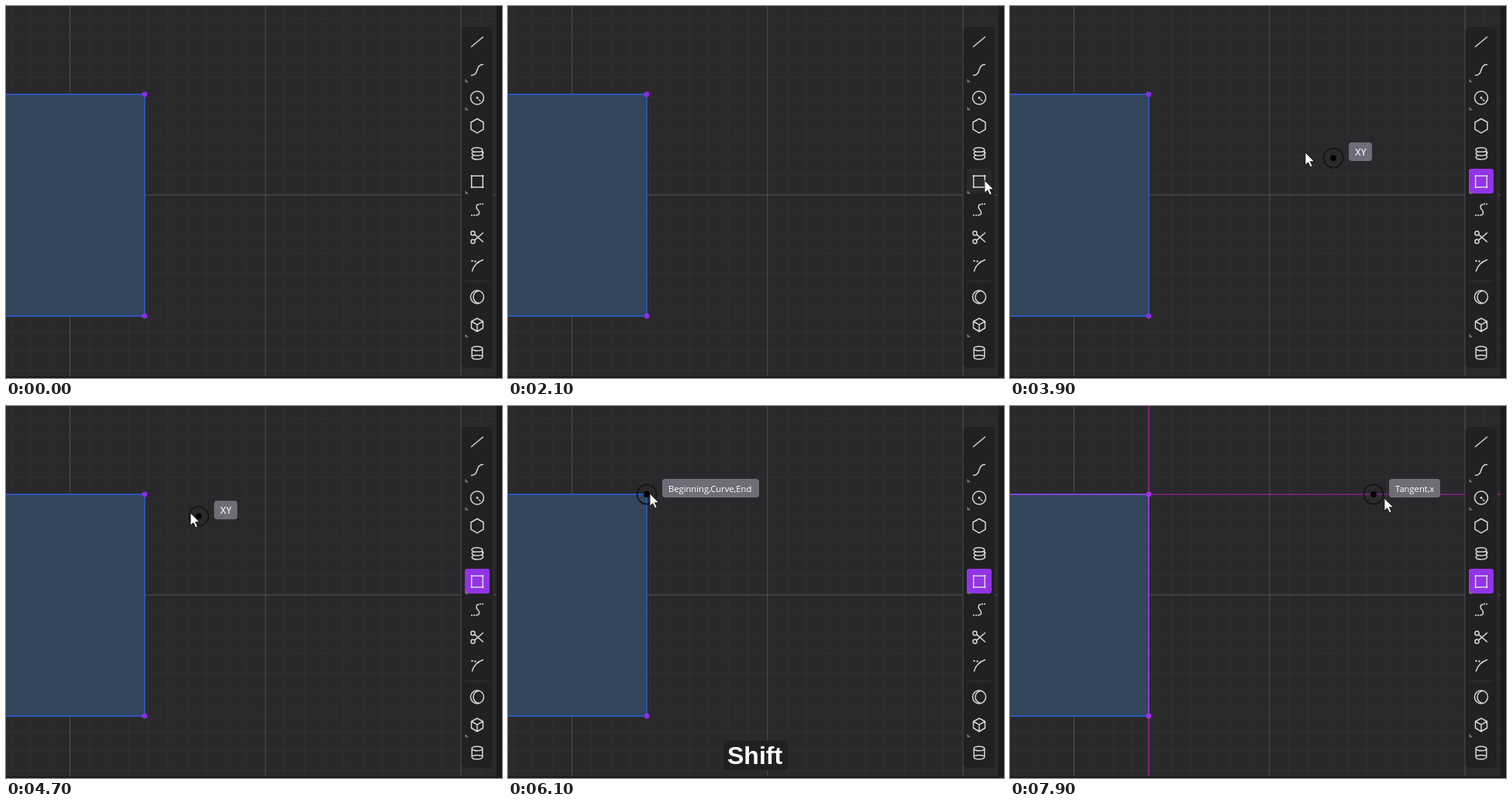
An HTML page that plays this animation: 640 px wide and 480 px high, repeating every 8 s.

```html
<!DOCTYPE html>
<html lang="en">
<head>
<meta charset="utf-8">
<title>Corner rectangle tool</title>
<style>
  html, body { margin: 0; width: 100%; height: 100%; overflow: hidden; background: #29292b; }
  svg { display: block; width: 640px; height: 480px; }
  .tip rect { fill: #6f6e78; }
  .tip text { font: 500 11.2px "Open Sans", "Noto Sans", sans-serif; fill: #fff; }
  .tip text.short { font-size: 12px; font-weight: 600; fill: #e6e6ec; }
  .key { font: bold 32px "Liberation Sans", Arial, sans-serif; fill: #fff; }
  .icons { fill: none; stroke: #d8d8da; stroke-width: 1.5; stroke-linecap: round; stroke-linejoin: round; }
</style>
</head>
<body>
<svg viewBox="0 0 640 480">
  <rect width="640" height="480" fill="#29292b"/>
  <g id="grid"></g>

  <rect x="-5" y="114" width="184" height="286" fill="#32455d"/>
  <path d="M0 114H179M0 400H179" stroke="#2c57ba" stroke-width="2"/>
  <path d="M179 114V400" stroke="#2c5bc6" stroke-width="1.6"/>
  <g id="guides" stroke-width="1.5">
    <path d="M179 0V114M179 400V480" stroke="#a0259b"/>
    <path d="M179 114H633" stroke="#8a2586"/>
    <path d="M0 114H179" stroke="#7c42d2" stroke-width="2"/>
    <path d="M179 114V400" stroke="#9a38da" stroke-width="1.8"/>
  </g>
  <g id="corners">
    <circle cx="179" cy="114" r="3.4"/>
    <circle cx="179" cy="400" r="3.4"/>
  </g>

  <rect x="633" width="7" height="480" fill="#1b1b1d"/>
  <rect y="478" width="640" height="2" fill="#1e191c"/>

  <g id="shift">
    <rect x="278" y="432" width="83" height="38" rx="4" fill="#202021"/>
    <text class="key" x="283" y="462">Shift</text>
  </g>

  <g id="snap">
    <circle r="12.5" fill="none" stroke="#131314" stroke-width="1.6"/>
    <circle r="3.9"/>
    <g class="tip" transform="translate(20 -20)">
      <rect id="tipBox" height="24" rx="4"/>
      <text id="tipText" x="8" y="17"></text>
    </g>
  </g>

  <rect x="587.5" y="26.5" width="41" height="441" rx="6" fill="#212123" stroke="#2d2d2f"/>
  <path d="M587.3 32V462" stroke="#38383a"/>
  <path d="M592 355H624" stroke="#343436"/>
  <rect id="button" x="592" y="210" width="32" height="32" rx="3"/>
  <path d="M592.5 94v4.500h4.500zM592.5 130v4.500h4.500zM592.5 238v4.500h4.500zM592.5 423v4.500h4.500z" fill="#77777a"/>

  <g class="icons" transform="translate(608 0)">
    <path d="M-7.500 52.500L7.500 40"/>
    <path d="M-7.500 89.500C3 89.500 -3 75.500 7.500 75.500"/>
    <g transform="translate(0 118.500)">
      <circle r="8.500"/>
      <path d="M0 0h.1" stroke-width="2.800"/>
      <path d="M2 2L4 4" stroke-width="1.100"/>
    </g>
    <path d="M0 145.500L8 150V159.200L0 163.800L-8 159.200V150Z"/>
    <g transform="translate(0 190.500)">
      <path d="M6.500 -3.500C9 -9 -7 -9 -7 -5S5 -2 6.500 -3.500C9 1 8 -2.500 6.500 1.500M-4 -2.500C-9 -1 -7 2.500 0 2.500S8 0 6.500 -2M-4 2C-9 4 -7 7.500 0 7.500S9 5 6.500 1.500"/>
    </g>
    <g transform="translate(0 226.500)">
      <path d="M-7.300 -7.300H7.300V7.300H-7.300Z"/>
      <path d="M-7.200 -7.200h.1M7.200 -7.200h.1M-7.200 7.200h.1M7.200 7.200h.1" stroke-width="2.400"/>
    </g>
    <g transform="translate(0 262.500)">
      <path d="M-1.500 7.500C5 7 2.500 2 .5 0C-2 -2.500 -1 -6.500 2 -6.500"/>
      <path d="M-7 7.500h.1M-4 7.500h.1M4 -7h.1M7 -7h.1" stroke-width="2"/>
    </g>
    <g transform="translate(0 298.500)">
      <circle cx="-5.500" cy="-5.300" r="2.600"/>
      <circle cx="-5.500" cy="5.300" r="2.600"/>
      <path d="M-3.300 -3.600L7.500 5.800M-3.300 3.600L7.500 -5.800"/>
    </g>
    <g transform="translate(0 334.500)">
      <path d="M-6.500 7.500C-5 1 1 -5 7.500 -7"/>
      <path d="M-6.500 -5.500h.1M-2.500 -5h.1M1 -3.500h.1" stroke-width="2.300"/>
    </g>
    <g transform="translate(0 375.500)">
      <circle r="8.500"/>
      <path d="M2.500 -8C-7.500 -7 -7.500 7 2.500 8"/>
    </g>
    <path d="M0 403L7.500 407V415.500L0 420L-7.500 415.500V407ZM-7.500 407L0 411.200L7.500 407M0 411.200V420"/>
    <g transform="translate(0 447.500)">
      <ellipse cy="-5.500" rx="6.800" ry="2.800"/>
      <path d="M-6.800 -5.500V5.500C-6.800 9.200 6.800 9.200 6.800 5.500V-5.500M-6.800 5C-6 2.200 6 2.200 6.800 5"/>
    </g>
  </g>

  <g id="hint" class="tip" transform="translate(474 214)">
    <rect width="106" height="24" rx="4"/>
    <text x="8" y="17">Corner rectangle</text>
  </g>

  <path id="cursor" d="M0 0V16.200L3.800 12.700L6.600 18.800L9.200 17.600L6.500 11.700H11.700Z" fill="#fff" stroke="#161617" stroke-width=".9"/>
</svg>

<script>
const LOOP = 8000, STEP = 100, LAG = 100;
const CORNER = { x: 179, y: 114 };
const el = id => document.getElementById(id);
const show = (id, on) => el(id).style.display = on ? "" : "none";

// Where the hand rests or turns: [time, x, y]
const stops = [
  [600, 520, 500], [1300, 515, 221], [1600, 515, 221], [2100, 615, 225],
  [3200, 615, 225], [3900, 381, 189], [4100, 321, 168], [4700, 238, 138],
  [5400, 183, 113], [6600, 183, 113], [7100, 298, 114], [7900, 483, 119], [8300, 512, 120]
];

// Smooth curve through the stops that never overshoots
function slope(i, axis) {
  if (i === 0 || i === stops.length - 1) return 0;
  const rate = k => (stops[k + 1][axis] - stops[k][axis]) / (stops[k + 1][0] - stops[k][0]);
  const a = rate(i - 1), b = rate(i);
  return a * b > 0 ? 2 * a * b / (a + b) : 0;
}

function hand(t) {
  const i = Math.max(0, stops.findIndex(s => s[0] > t) - 1);
  const a = stops[i], b = stops[i + 1], span = b[0] - a[0];
  const u = Math.max(0, (t - a[0]) / span), v = 1 - u;
  const at = axis =>
    v * v * (1 + 2 * u) * a[axis] + u * u * (3 - 2 * u) * b[axis] +
    span * u * v * (v * slope(i, axis) - u * slope(i + 1, axis));
  return { x: at(1), y: at(2) };
}

// The ring trails the hand, sticks to the corner, then slides along its tangent
function ring(t) {
  if (t < 5200) return hand(t - LAG);
  if (t < 6700) return CORNER;
  return { x: Math.max(CORNER.x, hand(t - LAG).x), y: CORNER.y };
}

function place(id, p) {
  el(id).setAttribute("transform", `translate(${p.x.toFixed(1)} ${p.y.toFixed(1)})`);
}

function drawGrid() {
  const gap = 25.23;
  let minor = "", major = "";
  for (let i = -13; i <= 12; i++) {
    const column = `M${(334.8 + i * gap).toFixed(1)} 0V480`;
    const row = `M0 ${(243.7 + i * gap).toFixed(1)}H633`;
    if (i % 10) minor += column; else major += column;
    if (i) minor += row; else major += row;
  }
  el("grid").innerHTML =
    `<path d="${minor}" stroke="#2f2f31" stroke-width="1.2"/>` +
    `<path d="${major}" stroke="#464648" stroke-width="1.4"/>`;
}

function setTip(t) {
  const [text, width] = t < 5200 ? ["XY", 30] : t < 6800 ? ["Beginning,Curve,End", 125] : ["Tangent,x", 66];
  el("tipText").textContent = text;
  el("tipText").setAttribute("class", text === "XY" ? "short" : "");
  el("tipBox").setAttribute("width", width);
}

function render(t) {
  place("cursor", hand(t));
  place("snap", ring(t));
  setTip(t);
  show("snap", t >= 3500);
  show("hint", t >= 2200 && t < 2600);
  show("shift", t >= 6100 && t < 7300);
  show("guides", t >= 6200);
  el("corners").setAttribute("fill", t >= 6200 ? "#a52cf0" : "#8d2ce2");
  el("button").setAttribute("fill", t >= 2600 ? "#9333e6" : t >= 2000 ? "#29292b" : "none");
}

const start = performance.now();
function tick() {
  const t = (performance.now() - start) % LOOP;
  render(Math.floor(t / STEP) * STEP);
  requestAnimationFrame(tick);
}
drawGrid();
tick();
</script>
</body>
</html>
```
